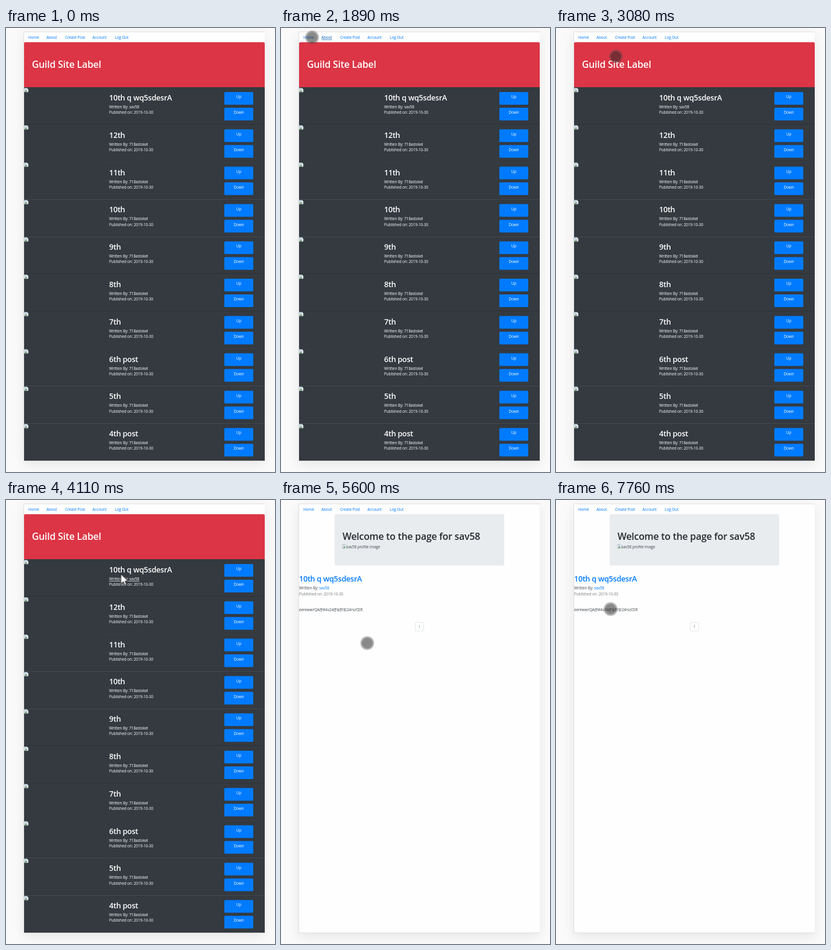
Write an HTML page that moves like this. It is 446 px wide and 735 px high and loops after 8000 ms.

```html
<!DOCTYPE html>
<html lang="en">
<head>
<meta charset="utf-8">
<title>Post list walkthrough</title>
<style>
html, body { margin: 0; width: 100%; height: 100%; overflow: hidden; background: #fafafa; }
.sheet {
  position: absolute; left: 29px; top: 6px; width: 399px; height: 709px;
  border: 1px solid #dfe0e1; border-right: 0; background: #fefefe;
  box-shadow: 0 6px 18px rgba(0, 0, 0, .08);
}
svg { position: absolute; left: 0; top: 0; width: 446px; height: 735px; }
text {
  font: 6.4px "Open Sans", "Noto Sans", sans-serif; letter-spacing: -.1px;
  fill: #444a50; white-space: pre; text-decoration-thickness: .6px;
}
.h1 { font-size: 15.8px; font-weight: 600; letter-spacing: -.2px; fill: #25292d; }
.h2 { font-size: 12.6px; font-weight: 600; letter-spacing: -.25px; }
.light, .row text, .btn text { fill: #fff; }
.btn text { text-anchor: middle; }
.btn rect, .link { fill: #007bff; }
.muted { fill: #777c81; }

/* Every track shares one 8 s clock. */
.t { animation: 8s step-end infinite; }
#home { animation-name: home; }
#about { animation-name: about; }
#profile { animation-name: profile; }
#navHome { animation-name: navHome; }
#navAbout { animation-name: navAbout; }
#author { animation-name: author; }
#dot { animation-name: dot; }
#arrow { animation-name: arrow; }
#cursor { animation-name: move; }

@keyframes home {
  0%, 36.5% { visibility: visible; }
  24.625%, 56.375%, 100% { visibility: hidden; }
}
@keyframes about {
  0%, 36.5%, 100% { visibility: hidden; }
  24.625% { visibility: visible; }
}
@keyframes profile {
  0% { visibility: hidden; }
  56.375%, 100% { visibility: visible; }
}
@keyframes navHome {
  0%, 36.5%, 100% { fill: #007bff; text-decoration-line: none; }
  28.625% { fill: #0056b3; text-decoration-line: underline; }
}
@keyframes navAbout {
  0%, 36.5%, 100% { fill: #007bff; text-decoration-line: none; }
  11.75% { fill: #0056b3; text-decoration-line: underline; }
  24.625% { fill: #73787e; text-decoration-line: none; }
}
@keyframes author {
  0%, 56.375%, 100% { text-decoration-line: none; }
  48.5% { text-decoration-line: underline; }
}
@keyframes dot {
  0%, 14.75%, 31.5%, 51.375% { visibility: hidden; }
  .875%, 17.625%, 33.5%, 59.125%, 100% { visibility: visible; }
}
@keyframes arrow {
  0%, 17.625%, 33.5%, 59.125%, 100% { visibility: hidden; }
  14.75%, 31.5%, 51.375% { visibility: visible; }
}
@keyframes move {
  0% { transform: translate(314.5px, 622.5px); }
  .875% { transform: translate(314.5px, 622.5px); animation-timing-function: steps(3); }
  3.875% { transform: translate(255px, 440px); animation-timing-function: steps(3); }
  6.875% { transform: translate(140px, 150px); animation-timing-function: steps(3); }
  9.75% { transform: translate(87px, 32px); }
  10.75% { transform: translate(82.5px, 22.5px); }
  11.75% { transform: translate(79px, 17px); }
  12.75% { transform: translate(75.5px, 14.5px); }
  14.75% { transform: translate(76.5px, 15.5px); }
  19.625% { transform: translate(75px, 15.5px); animation-timing-function: steps(2); }
  21.625% { transform: translate(70px, 15.5px); animation-timing-function: steps(2); }
  23.625% { transform: translate(51.5px, 15.5px); }
  24.625% { transform: translate(44px, 15.5px); animation-timing-function: steps(2); }
  26.625% { transform: translate(37.5px, 15.5px); }
  28.625% { transform: translate(36.5px, 16px); }
  29.625% { transform: translate(37.5px, 16.5px); }
  33.5% { transform: translate(38.5px, 16px); }
  34.5% { transform: translate(45px, 14.5px); }
  35.5% { transform: translate(55.5px, 16.5px); animation-timing-function: steps(2); }
  37.5% { transform: translate(85px, 33px); animation-timing-function: steps(3); }
  40.5% { transform: translate(128px, 75px); animation-timing-function: steps(3); }
  43.5% { transform: translate(156.5px, 102.5px); }
  44.5% { transform: translate(168px, 110px); animation-timing-function: steps(4); }
  48.5% { transform: translate(190.5px, 122.5px); }
  62.125% { transform: translate(189.5px, 122.5px); }
  64% { transform: translate(192px, 126px); animation-timing-function: steps(2); }
  66% { transform: translate(202.5px, 190px); animation-timing-function: steps(2); }
  68% { transform: translate(190px, 310.5px); animation-timing-function: steps(3); }
  71% { transform: translate(119.5px, 200px); animation-timing-function: steps(2); }
  73% { transform: translate(128px, 130px); }
  75% { transform: translate(130.5px, 105px); animation-timing-function: steps(2); }
  77% { transform: translate(118px, 86.5px); animation-timing-function: steps(2); }
  79% { transform: translate(106px, 115px); animation-timing-function: steps(2); }
  81% { transform: translate(103.5px, 141.5px); }
  83% { transform: translate(103px, 139px); animation-timing-function: steps(3); }
  86% { transform: translate(97px, 129.5px); animation-timing-function: steps(4); }
  90% { transform: translate(91px, 155px); animation-timing-function: steps(3); }
  93% { transform: translate(89.5px, 177.5px); }
  94% { transform: translate(89.5px, 178.5px); }
  95% { transform: translate(90.5px, 179.5px); }
  97%, 100% { transform: translate(90.5px, 180.5px); }
}
</style>
</head>
<body>
<div class="sheet"></div>
<svg viewBox="0 0 446 735">
  <defs>
    <g id="broken">
      <path d="M0 0H5L7 2V6.5H0Z" fill="#e4e9ee" stroke="#9aa3ab" stroke-width=".5"/>
      <path d="M.6 6L3 3.2L5 4.4L3.6 6Z" fill="#5b9a57"/>
      <path d="M1 1.2H4V2.6H1Z" fill="#a9c6ea"/>
    </g>
  </defs>

  <g id="home" class="t">
    <rect x="30" y="23.5" width="399" height="80" rx="2" fill="#dc3545"/>
    <text class="h1 light" x="43" y="66">Guild Site Label</text>
    <g id="rows"></g>
  </g>

  <g id="about" class="t">
    <rect x="30" y="23.5" width="398.5" height="100.5" fill="#e9ecef"/>
    <text class="h1" x="43" y="66" style="fill:#34503f">Info about company</text>
    <text x="43" y="79.3">Lorem ipsum dolor sit amet consectetur adipisicing elit. Et quia ipsa nihil vel modi, dolore soluta vero error ut inventore corporis</text>
    <text x="43" y="89.3">asperiores atque ab cupiditate consequatur magni placeat minima voluptatum!</text>
  </g>

  <g id="profile" class="t">
    <rect x="89" y="23.5" width="281" height="85" rx="2" fill="#e9ecef"/>
    <text class="h1" x="102" y="66">Welcome to the page for sav58</text>
    <use href="#broken" x="102" y="73.5"/>
    <text x="108.5" y="80">sav58 profile image</text>
    <text class="h2 link" x="30" y="135">10th q wq5sdesrA</text>
    <text x="30" y="148">Written By: <tspan class="link">sav58</tspan></text>
    <text class="muted" x="30" y="158">Published on: 2019-10-30</text>
    <text x="30" y="184.2">eerewwrQA@#4v24@$@!$!24rszCER</text>
    <rect x="222.5" y="202.5" width="14" height="14.5" rx="1.5" fill="#fff" stroke="#dee2e6" stroke-width=".8"/>
    <text class="muted" x="227.8" y="212.2">1</text>
  </g>

  <g>
    <text id="navHome" class="link t" x="37" y="18">Home</text>
    <text id="navAbout" class="link t" x="67" y="18">About</text>
    <text class="link" x="98" y="18">Create Post</text>
    <text class="link" x="143.3" y="18">Account</text>
    <text class="link" x="180.3" y="18">Log Out</text>
  </g>

  <g id="cursor" class="t">
    <g id="dot" class="t">
      <circle r="9" fill="#282828" fill-opacity=".55"/>
      <circle r="10.1" fill="none" stroke="#505050" stroke-opacity=".42" stroke-width="2.4"/>
    </g>
    <path id="arrow" class="t" d="M0 0V16.5L4 12.8L6.6 18.5L9.2 17.4L6.8 11.8H11.5Z" fill="#fff" stroke="#111" stroke-width=".9"/>
  </g>
</svg>
<script>
const titles = ["10th q wq5sdesrA", "12th", "11th", "10th", "9th", "8th", "7th", "6th post", "5th", "4th post"];
const pitch = 61.8;

const button = (label, y) => `<g class="btn">
  <rect x="362" y="${y}" width="48" height="21" rx="1.5"/>
  <text x="386" y="${y + 10.3}">${label}</text></g>`;

const row = (title, i) => `<g class="row" transform="translate(0 ${98 + i * pitch})">
  <rect x="30" width="399" height="${pitch}" fill="#343a40"/>
  <path d="M30 ${pitch - .3}H429" stroke="#2b3035"/>
  <use href="#broken" x="30" y="1.5"/>
  <text class="h2" x="171" y="22">${title}</text>
  <text ${i ? "" : 'id="author" class="t"'} x="171" y="35">Written By: ${i ? "718astokel" : "sav58"}</text>
  <text x="171" y="44.2">Published on: 2019-10-30</text>
  ${button("Up", 8)}${button("Down", 34)}</g>`;

document.getElementById("rows").innerHTML = titles.map(row).join("");
</script>
</body>
</html>
```
